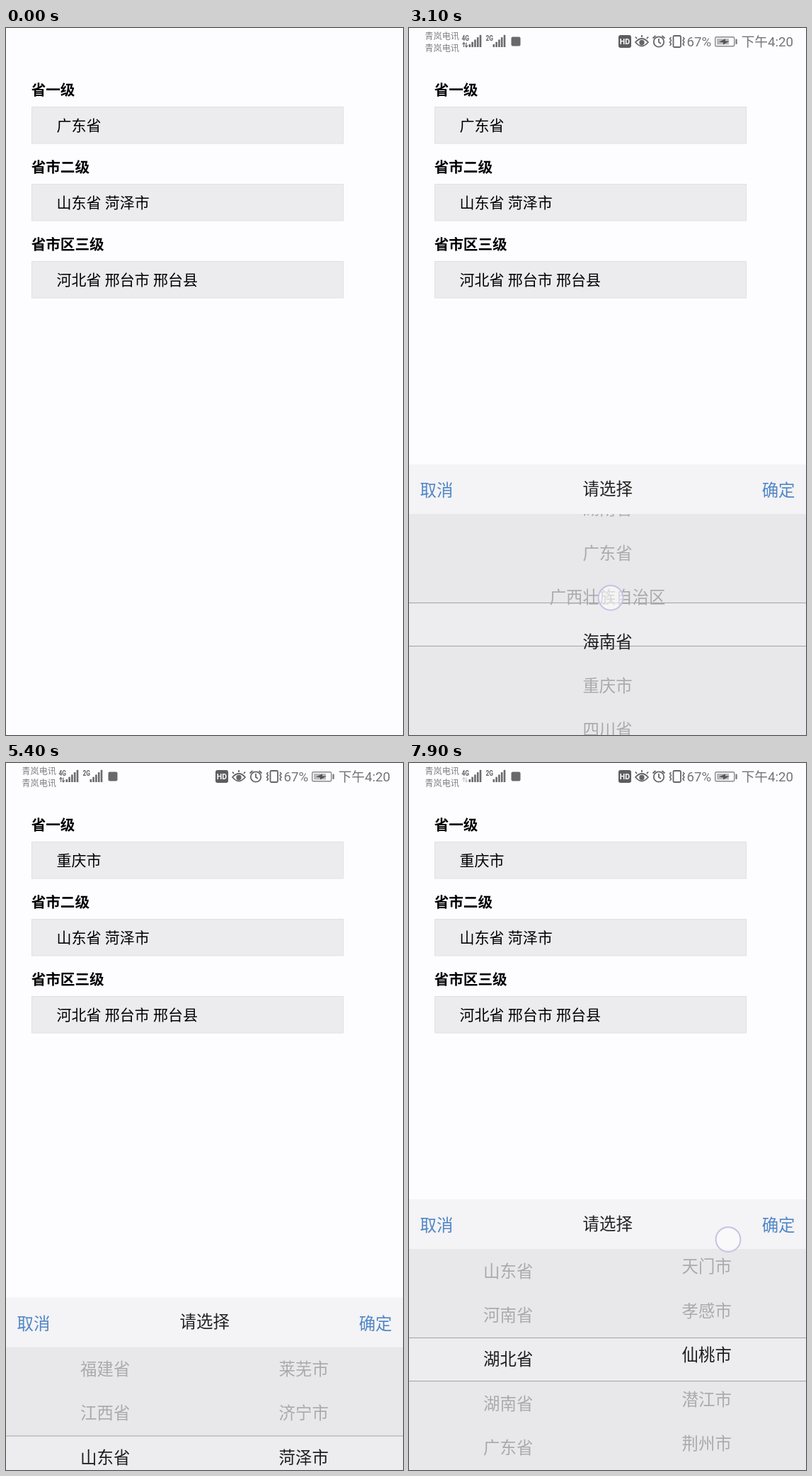
Animation, 561 px wide and 998 px high, one loop 8000 ms. Source, as an HTML page:

```html
<!DOCTYPE html>
<html lang="zh-CN">
<head>
<meta charset="utf-8">
<title>地区选择</title>
<style>
  html, body { margin: 0; width: 100%; height: 100%; overflow: hidden; background: #fdfcfe; }
  svg { display: block; width: 100vw; height: 100vh; }
  text { font-family: Roboto, "Noto Sans CJK SC", "Noto Sans CJK", sans-serif; white-space: pre; }
  .label { font-size: 20.6px; font-weight: 700; }
  .value { font-size: 21px; }
  .sheet { font-size: 23.4px; }
  .clock { font-size: 18.7px; fill: #747476; }
  .carrier { font-size: 12.2px; fill: #808082; }
  .net { font-size: 10px; font-weight: 700; fill: #626264; }
</style>
</head>
<body>
<svg id="stage" viewBox="0 0 561 998" preserveAspectRatio="none">
  <defs><clipPath id="wheelClip"><rect y="686" width="561" height="312"/></clipPath></defs>
  <rect width="561" height="998" fill="#fdfcfe"/>
  <g id="status"></g>
  <g id="form"></g>
  <g id="sheet">
    <rect y="616" width="561" height="70" fill="#f4f3f5"/>
    <rect y="686" width="561" height="312" fill="#e8e7ea"/>
    <rect y="811" width="561" height="62" fill="#edecef"/>
    <path d="M0 811.5H561M0 872.5H561" stroke="#a3a3a5"/>
    <g class="sheet">
      <text x="15.5" y="661.3" fill="#4f86c6">取消</text>
      <text x="280.7" y="658.6" text-anchor="middle" fill="#222">请选择</text>
      <text x="545.5" y="661.3" text-anchor="end" fill="#4f86c6">确定</text>
      <g id="wheels" clip-path="url(#wheelClip)"></g>
    </g>
  </g>
  <circle id="touch" r="17.4" fill="#fff" fill-opacity=".55" stroke="#c5c3e5" stroke-width="2"/>
</svg>
<script>
const LOOP = 8000, ROW = 62.4, CENTER = 841.6, SHEET_HEIGHT = 382;
const $ = id => document.getElementById(id);
const clamp = v => Math.max(0, Math.min(1, v));

// Easing curves
const linear = p => p;
const easeOut = p => 1 - (1 - p) ** 2;
const smooth = p => p * p * (3 - 2 * p);
const ease = p => {
  const curve = (u, a, b) => 3 * u * (1 - u) ** 2 * a + 3 * u * u * (1 - u) * b + u ** 3;
  let low = 0, high = 1;
  for (let i = 0; i < 20; i++) {
    const mid = (low + high) / 2;
    if (curve(mid, .25, .25) < p) low = mid; else high = mid;
  }
  return curve(low, .1, 1);
};

// Keys are [time, value, easing towards this key]
function track(t, keys) {
  let [from, value] = keys[0];
  for (const [time, next, easing = linear] of keys) {
    if (t < time) return value + (next - value) * easing(clamp((t - from) / (time - from)));
    [from, value] = [time, next];
  }
  return value;
}

// Status bar
const bars = x => [0, 1, 2, 3, 4].map(i => {
  const h = 4 + i * 3.3;
  return `<rect x="${x + i * 3.8}" y="${27 - h}" width="2.6" height="${h}" fill="#6a6a6c"/>`;
}).join('');

$('status').innerHTML = `
  <g class="carrier"><text x="22.3" y="15.6">青岚电讯</text><text x="22.3" y="32.6">青岚电讯</text></g>
  <text class="net" x="74.5" y="18" textLength="10.5" lengthAdjust="spacingAndGlyphs">4G</text>
  <text class="net" x="108.5" y="18" textLength="10.5" lengthAdjust="spacingAndGlyphs">2G</text>
  <path id="data" d="M77.5 27V21.5M75.5 23L77.5 20.5L79.5 23M81 20.5V26M79.5 24.5L81 27L83 24.5" fill="none" stroke-width="1.2"/>
  ${bars(84.5)}${bars(118.5)}
  <rect x="144.5" y="12.5" width="13" height="13" rx="2" fill="#69696b"/>
  <rect x="296" y="10" width="18" height="18" rx="3" fill="#5d5d5f"/>
  <text x="305" y="23" text-anchor="middle" font-size="10.5" font-weight="700" fill="#fff">HD</text>
  <g fill="none" stroke="#656567" stroke-width="1.8">
    <path d="M320 20Q329 10 338 20Q329 31 320 20ZM322 15L320 12.5M329 13V10M336 15L338 12.5"/>
    <circle cx="329" cy="20.5" r="2.8" fill="#656567"/>
    <circle cx="353" cy="19.5" r="7.2"/>
    <path d="M353 15V20L356 22M344.5 14.5L348.5 11M361.5 14.5L357.5 11"/>
    <rect x="373.5" y="11" width="10.5" height="16" rx="1.5"/>
    <path d="M370.5 13L368.5 15L370.5 17.5L368.5 20L370.5 22.5L368.5 25M387 13L389 15L387 17.5L389 20L387 22.5L389 25" stroke-width="1.5"/>
    <rect x="432.7" y="12.7" width="27" height="13" rx="2" stroke="#88888a" stroke-width="1.4"/>
  </g>
  <rect x="435" y="15" width="17" height="8.5" fill="#b9b9bb"/>
  <path d="M438 19.5L447 15.5V18.5H453L444 23.5V20.5Z" fill="#555557"/>
  <rect x="461.5" y="15.5" width="2.2" height="7.5" rx="1" fill="#777779"/>
  <text class="clock" x="392.5" y="26">67%</text>
  <text class="clock" x="469.7" y="26">下午4:20</text>`;

// Form
$('form').innerHTML = [
  ['省一级', '广东省'],
  ['省市二级', '山东省 菏泽市'],
  ['省市区三级', '河北省 邢台市 邢台县']
].map(([label, value], i) => `<g transform="translate(0 ${i * 109})">
  <text class="label" x="35.7" y="95.3">${label}</text>
  <rect x="36.5" y="111.5" width="440" height="51.5" fill="#ecebed" stroke="#e0e1e4"/>
  <text class="value" x="71.5" y="145.3">${value}</text></g>`).join('');
const provinceField = document.querySelector('#form .value');

// Picker wheels
function makeWheel(x, names) {
  const group = document.createElementNS('http://www.w3.org/2000/svg', 'g');
  group.innerHTML = names.map((name, i) =>
    `<text x="${x}" y="${CENTER + 8.8 + i * ROW}" text-anchor="middle">${name}</text>`).join('');
  $('wheels').append(group);
  return (visible, position) => {
    group.style.display = visible ? '' : 'none';
    group.setAttribute('transform', `translate(0 ${-position * ROW})`);
    [...group.children].forEach((row, i) =>
      row.setAttribute('fill', i === Math.round(position) ? '#1c1c1e' : '#aaa9ac'));
  };
}
const provinces = ['福建省', '江西省', '山东省', '河南省', '湖北省', '湖南省', '广东省',
  '广西壮族自治区', '海南省', '重庆市', '四川省', '贵州省', '云南省'];
const singleWheel = makeWheel(280.5, provinces);
const provinceWheel = makeWheel(140.2, provinces);
const shandongWheel = makeWheel(420.7, ['莱芜市', '济宁市', '菏泽市', '临沂市', '日照市']);
const hubeiWheel = makeWheel(420.7, ['武汉市', '天门市', '孝感市', '仙桃市', '潜江市', '荆州市', '宜昌市']);

const singlePosition = t => track(t, [[2700, 6], [3350, 8.4, smooth], [4080, 9, easeOut]]);
const provincePosition = t => track(t, [[6280, 2], [6830, 4.23, smooth], [6900, 4.23], [7080, 4, smooth]]);
const cityPosition = t => track(t, [[7180, 0], [7900, 3.1, smooth]]);
const CITY_SWITCH = 7080;

const touches = [
  { x: 375, y: 139, start: 1480, end: 1620 },
  { x: 285, y: 905, start: 2680, end: 3350, scroll: singlePosition },
  { x: 522, y: 652, start: 4180, end: 4330 },
  { x: 375, y: 246, start: 5080, end: 5200 },
  { x: 178.5, y: 864, start: 6280, end: 6830, scroll: provincePosition },
  { x: 451, y: 866, start: 7180, end: LOOP, scroll: cityPosition }
];

function drawTouch(t) {
  const active = touches.find(({ start, end }) => t >= start && t < end + 120);
  $('touch').style.display = active ? '' : 'none';
  if (!active) return;
  const { x, y, start, end, scroll } = active;
  const held = Math.min(t, end);
  const travel = scroll ? (scroll(held) - scroll(start)) * ROW : 0;
  $('touch').setAttribute('cx', x);
  $('touch').setAttribute('cy', y - travel);
  $('touch').setAttribute('opacity', 1 - clamp((t - end) / 120));
}

function render(t) {
  $('status').setAttribute('opacity', track(t, [[50, 0], [800, 1, smooth]]));
  $('data').setAttribute('stroke', t < 5850 ? '#6a6a6c' : '#cbcbcd');
  provinceField.textContent = t < 4500 ? '广东省' : '重庆市';

  const open = track(t, [[1790, 0], [2090, 1, ease], [4400, 1], [4700, 0, ease], [5290, 0], [5590, 1, ease]]);
  $('sheet').setAttribute('transform', `translate(0 ${(1 - open) * SHEET_HEIGHT})`);
  $('sheet').style.display = open ? '' : 'none';

  const paired = t > 5000;
  singleWheel(!paired, singlePosition(t));
  provinceWheel(paired, provincePosition(t));
  shandongWheel(paired && t < CITY_SWITCH, 2);
  hubeiWheel(t >= CITY_SWITCH, cityPosition(t));
  drawTouch(t);
}

const began = performance.now();
function tick() {
  render((performance.now() - began) % LOOP);
  requestAnimationFrame(tick);
}
tick();
</script>
</body>
</html>
```
